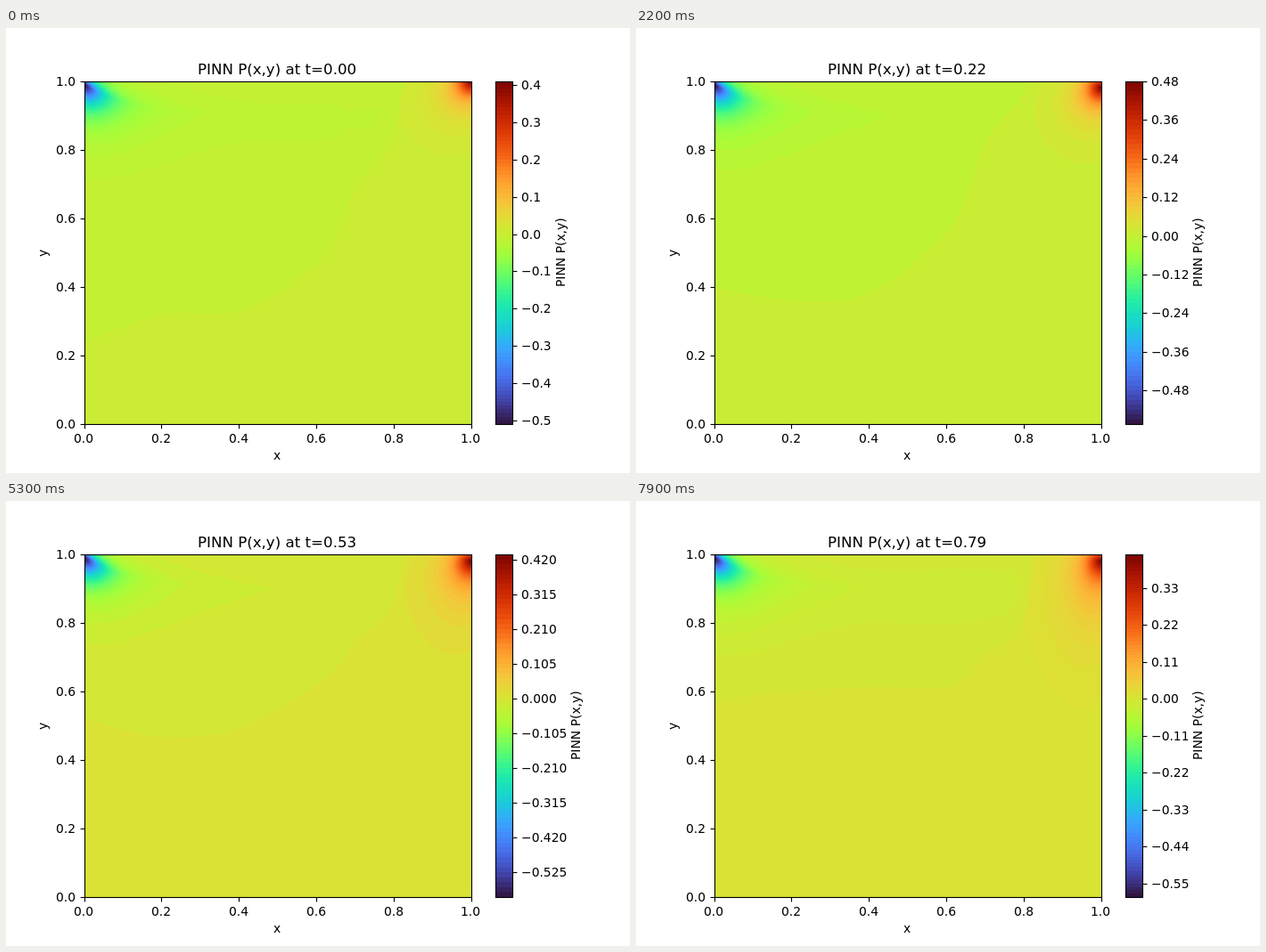
Recreate the animation shown at these times as an HTML page with a canvas. Size 700 by 500 pixels, loop 8 s.

```html
<!DOCTYPE html>
<html lang="en">
<head>
<meta charset="utf-8">
<title>PINN P(x,y)</title>
<style>
html, body { margin: 0; width: 100%; height: 100%; overflow: hidden; background: #fff; }
canvas { display: block; }
</style>
</head>
<body>
<canvas id="stage" width="700" height="500"></canvas>
<script>
const ctx = document.getElementById('stage').getContext('2d');
const W = 434, H = 385, LEFT = 88, TOP = 60;
const FONT = '"DejaVu Sans", sans-serif';
const STEPS = 80, STEP_MS = 100;
const { exp, hypot, round, floor, ceil } = Math;

// extremes of the pressure field at time t
const lowest = t => -.505 - .1235 * (1 - exp(-t / .2)) + .0655 * t ** 1.5;
const highest = t => .4095 + t * exp(-t / .17) + .012 * t ** 3;

// smooth curve through a few points
function hermite(xs, ys, x) {
  const n = xs.length - 1;
  let i = 0;
  while (i < n - 1 && x > xs[i + 1]) i++;
  const slope = k => {
    const a = Math.max(k - 1, 0), b = Math.min(k + 1, n);
    return (ys[b] - ys[a]) / (xs[b] - xs[a]);
  };
  const w = xs[i + 1] - xs[i], u = (x - xs[i]) / w, u2 = u * u, u3 = u2 * u;
  return (2 * u3 - 3 * u2 + 1) * ys[i] + (u3 - 2 * u2 + u) * w * slope(i)
    + (3 * u2 - 2 * u3) * ys[i + 1] + (u3 - u2) * w * slope(i + 1);
}

// height of the zero contour over x
function zeroCurve(t) {
  const dip = .32 + .12 * t + .3 * t * t;
  const knee = .468 + .5 * t - .4 * t * t;
  const bulge = .69 + 2.2 * t * exp(-t / .17);
  const xs = [0, .2, .4, .6, .65, .7, .8, .84];
  const ys = [
    .24 + .4 * (1 - exp(-t / .44)), dip, .33 + .2 * t + .2 * t * t,
    knee, knee + .37 * (bulge - knee), bulge, bulge + .16 - .06 * t, 1.1
  ];
  return x => x < .84 ? hermite(xs, ys, x) : 9;
}

// turbo colour map from evenly spaced stops
const STOPS = '30123b 4145ab 4675ed 39a2fc 1bcfd4 24eca6 61fc6c a4fc3b d1e834 f3c63a fe9b2d f36315 d93806 b11901 7a0402'
  .split(' ').map(s => parseInt(s, 16));
const AT = STOPS.map((_, i) => i / (STOPS.length - 1));
const CHANNELS = [16, 8, 0].map(bits => STOPS.map(c => c >> bits & 255));
const turbo = x => CHANNELS.map(c => round(Math.min(255, Math.max(0, hermite(AT, c, x)))));

const falloff = z => {
  const q = 1 + z * Math.sqrt(z);
  return 1 / (q * q);
};

// the cold tongue and the trough keep their shape, only their strength varies
const cold = new Float32Array(W * H), trough = new Float32Array(W * H);
for (let j = 0, p = 0; j < H; j++) {
  const h = (j + .5) / H;
  for (let i = 0; i < W; i++, p++) {
    const x = (i + .5) / W;
    const axis = .01 + .09 * (1 - exp(-x / .13));
    const u = .305 * (1 - exp(-x / .27));
    const v = h > axis ? h - axis : 2 * (axis - h);
    const e = 1.3 + .7 * exp(-hypot(x, h) / .08);
    cold[p] = falloff((u ** e + v ** e) ** (1 / e) / .081);
    trough[p] = exp(-.5 * (((x - .69) / .17) ** 2 + ((h - .125) / .06) ** 2));
  }
}

const layer = document.createElement('canvas');
layer.width = W;
layer.height = H;
const lctx = layer.getContext('2d');
const img = lctx.createImageData(W, H);

function drawField(t, min, max, step, i0, colors) {
  const zero = zeroCurve(t), edge = [], tilt = [], wall = [];
  const depth = .0005 + .044 * (t - .32) ** 2;
  const reach = .98 - .6 * t, spot = .02 * (1 - exp(-t / .1));
  for (let i = 0; i < W; i++) {
    const x = (i + .5) / W, k = (zero(x + .005) - zero(x - .005)) / .01;
    edge.push(zero(x));
    tilt.push(1 / hypot(1, k));
    wall.push(1 + .15 * exp((x - 1) / .05));
  }
  for (let j = 0, p = 0; j < H; j++) {
    const h = (j + .5) / H;
    const sx = 1.04 * (1 + .38 * exp(-h / .07));
    const sy = h < spot ? 1.5 : reach + (1.1 - reach) * exp(-h / .1);
    for (let i = 0; i < W; i++, p++) {
      const d = (1 - h - edge[i]) * tilt[i];
      let val;
      if (d > 0) {
        val = (min * cold[p] - depth * trough[p]) * (1 - exp(-d / .05));
      } else {
        const dx = (1 - (i + .5) / W) * sx, dy = (h - spot) * sy * wall[i];
        val = max * falloff(Math.sqrt(dx * dx + dy * dy) / .076);
      }
      let b = floor(val / step) - i0;
      if (d > 0) b = Math.min(b, -1 - i0);
      const c = colors[Math.max(0, Math.min(colors.length - 1, b))], o = p * 4;
      img.data[o] = c[0];
      img.data[o + 1] = c[1];
      img.data[o + 2] = c[2];
      img.data[o + 3] = 255;
    }
  }
  lctx.putImageData(img, 0, 0);
  ctx.drawImage(layer, LEFT, TOP);
}

const snap = v => floor(v + .5) + .5;

function line(x1, y1, x2, y2) {
  ctx.beginPath();
  ctx.moveTo(x1, y1);
  ctx.lineTo(x2, y2);
  ctx.stroke();
}

// align: 0 left, .5 centre, 1 right; the text starts on a whole pixel
function text(str, x, y, align, size = 13.89) {
  ctx.font = size + 'px ' + FONT;
  ctx.fillText(str, round(x - align * ctx.measureText(str).width), y);
}

function upright(str, x) {
  ctx.save();
  ctx.translate(x, 252);
  ctx.rotate(-Math.PI / 2);
  text(str, -.5, 0, .5);
  ctx.restore();
}

function drawBar(step, i0, i1, colors) {
  const n = i1 - i0, yOf = i => 445 - H * (i - i0) / n;
  colors.forEach((c, b) => {
    const y = round(yOf(i0 + b + 1));
    ctx.fillStyle = `rgb(${c})`;
    ctx.fillRect(549, y, 20, round(yOf(i0 + b)) - y);
  });
  ctx.fillStyle = '#000';
  ctx.strokeRect(549.5, 60.5, 19, 385);

  const skip = ceil((n + 1) / 10), unit = skip * step;
  let dec = 1;
  while (Math.abs(unit * 10 ** dec - round(unit * 10 ** dec)) > 1e-6) dec++;
  for (let i = ceil(i0 / skip) * skip; i <= i1; i += skip) {
    const y = yOf(i);
    line(569, snap(y), 573.4, snap(y));
    text((i < 0 ? '\u2212' : '') + Math.abs(i * step).toFixed(dec), 577.6, round(y + 5), 0);
  }
  upright('PINN P(x,y)', floor(627 + 8.84 * (dec - 1)));
}

function drawAxes(t) {
  ctx.strokeRect(88.5, 60.5, 434, 385);
  for (let i = 0; i <= 5; i++) {
    const x = 87.5 + W * i / 5, y = 445 - H * i / 5, label = (i / 5).toFixed(1);
    line(snap(x), 446, snap(x), 450.4);
    text(label, x, 466, .5);
    line(83.6, snap(y), 88, snap(y));
    text(label, 77.8, round(y + 5), 1);
  }
  text('x', 304.5, 485, .5);
  upright('y', 46);
  text('PINN P(x,y) at t=' + t.toFixed(2), 304.5, 52, .5, 16.67);
}

function draw(t) {
  const min = lowest(t), max = highest(t);
  const step = max - min > 1.01 ? .015 : .01;
  const i0 = floor(min / step), i1 = ceil(max / step), n = i1 - i0;
  const colors = Array.from({ length: n }, (_, b) => turbo((b + .5) / n));
  ctx.fillStyle = '#fff';
  ctx.fillRect(0, 0, 700, 500);
  ctx.strokeStyle = '#000';
  ctx.lineWidth = 1.11;
  drawField(t, min, max, step, i0, colors);
  drawBar(step, i0, i1, colors);
  drawAxes(t);
}

let shown = -1;
const start = performance.now();
function tick() {
  const k = floor((performance.now() - start) / STEP_MS) % STEPS;
  if (k !== shown) {
    shown = k;
    draw(k / 100);
  }
  requestAnimationFrame(tick);
}
tick();
</script>
</body>
</html>
```
